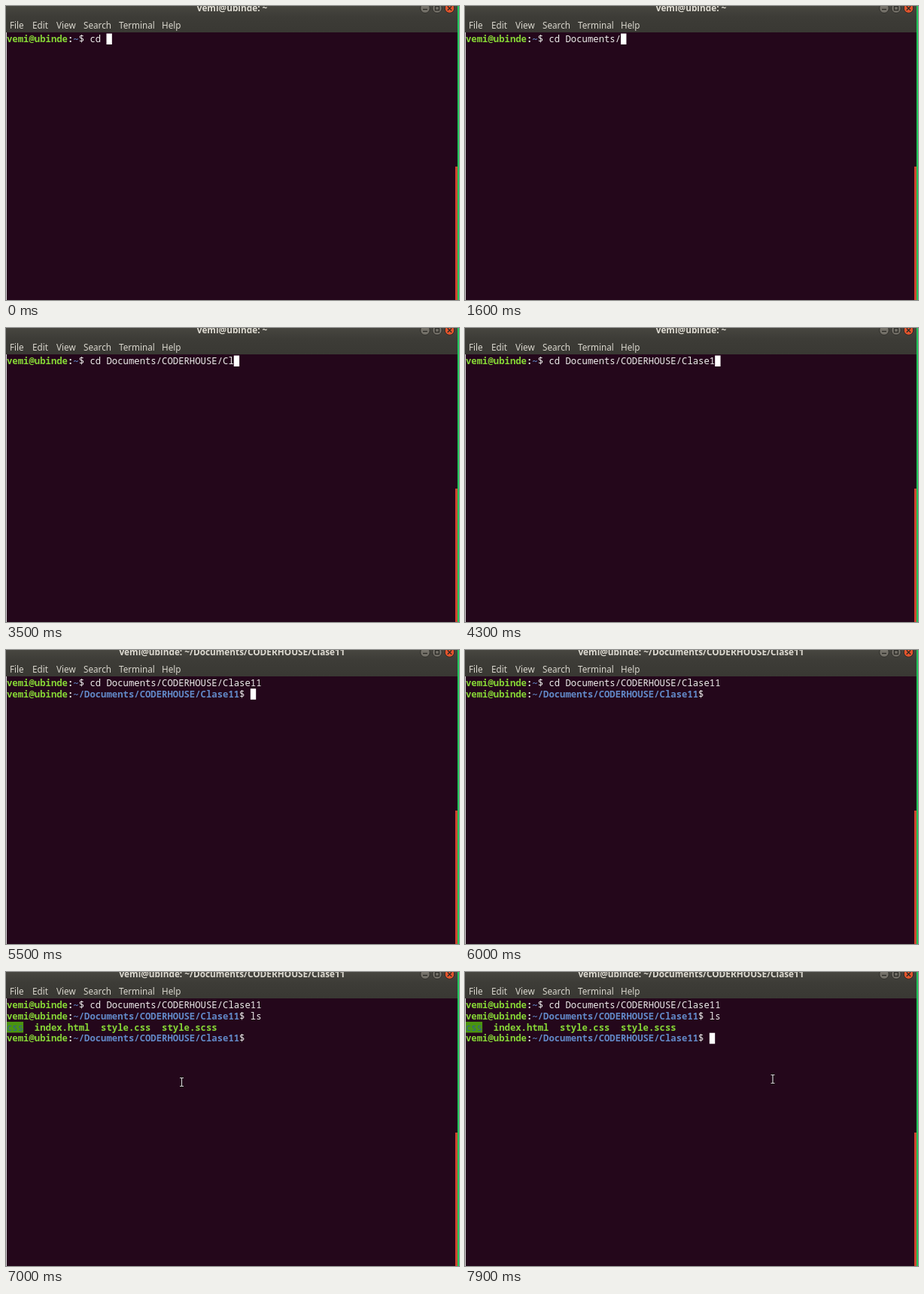
An HTML page with a canvas that plays this animation: 602x390 px, repeating every 8 s.

```html
<!DOCTYPE html>
<html lang="en">
<head>
<meta charset="utf-8">
<title>Terminal</title>
<style>
html, body { margin: 0; width: 100%; height: 100%; overflow: hidden; background: #24071b; }
canvas { display: block; width: 602px; height: 390px; }
</style>
</head>
<body>
<canvas id="stage" width="602" height="390"></canvas>
<script>
const ctx = document.getElementById('stage').getContext('2d');
const LOOP = 8000, STEP = 100, BLINK = 600;
const CELL = 7.36, LEFT = 1, TOP = 36.5, ROW = 14.75;
const MONO = '12.27px "Noto Sans Mono", "DejaVu Sans Mono", monospace';
const SANS = '"Noto Sans", "Open Sans", sans-serif';
const GREEN = '#86d636', BLUE = '#6289c8', WHITE = '#eeeeec';

const USER = 'vemi@ubinde';
const DIR = '~/Documents/CODERHOUSE/Clase11';

// [time, command line after the key press]
const TYPING = [
  [0, 'cd '], [700, 'cd D'], [900, 'cd Do'], [1100, 'cd Doc'],
  [1300, 'cd Documents/'],
  [1900, 'cd Documents/C'], [2100, 'cd Documents/CODERHOUSE/'],
  [3300, 'cd Documents/CODERHOUSE/C'], [3500, 'cd Documents/CODERHOUSE/Cl'],
  [3700, 'cd Documents/CODERHOUSE/Clase'],
  [4200, 'cd Documents/CODERHOUSE/Clase1'],
  [4500, 'cd Documents/CODERHOUSE/Clase11'],
  [5400, ''], [6100, 'l'], [6200, 'ls'], [6400, '']
];
const CD_DONE = 5400, TITLE_AT = 5500, LS_DONE = 6400;
const POINTER_IN = 6800, MOVE_FROM = 7200, MOVE_TO = 7800;

function rect(x, y, w, h, color) {
  ctx.fillStyle = color;
  ctx.fillRect(x, y, w, h);
}

function text(str, x, y, font, color, align = 'left') {
  ctx.font = font;
  ctx.fillStyle = color;
  ctx.textAlign = align;
  ctx.fillText(str, x, y);
}

function put(str, col, row, color, bold) {
  const y = Math.round(TOP + 11.5 + row * ROW);
  text(str, LEFT + col * CELL, y, (bold ? 'bold ' : '') + MONO, color);
}

function block(col, row, cells, color) {
  rect(LEFT + col * CELL, TOP + row * ROW, cells * CELL, 14.5, color);
}

// Draws a prompt with its command and returns the column after it.
function prompt(row, dir, cmd) {
  let col = 0;
  const parts = [[USER, GREEN, true], [':', WHITE, true], [dir, BLUE, true], ['$ ' + cmd, WHITE, false]];
  for (const [str, color, bold] of parts) {
    put(str, col, row, color, bold);
    col += str.length;
  }
  return col;
}

function listing(row) {
  block(0, row, 3, '#4a9410');
  put('css', 0, row, '#2f5f96');
  put('index.html', 5, row, GREEN, true);
  put('style.css', 17, row, GREEN, true);
  put('style.scss', 28, row, GREEN, true);
}

function button(x, color, glyph) {
  ctx.beginPath();
  ctx.arc(x, 3, 6.3, 0, Math.PI * 2);
  ctx.fillStyle = color;
  ctx.fill();
  ctx.strokeStyle = '#2c2b27';
  ctx.lineWidth = 1;
  ctx.stroke();
  ctx.lineWidth = 1.4;
  ctx.beginPath();
  glyph(x);
  ctx.stroke();
}

function chrome(title) {
  const shade = ctx.createLinearGradient(0, 0, 0, 35);
  shade.addColorStop(0, '#474640');
  shade.addColorStop(0.4, '#3d3c37');
  shade.addColorStop(1, '#393833');
  rect(0, 0, 602, 35, shade);
  text(title, 300.5, 7, 'bold 11.8px ' + SANS, '#dedbd2', 'center');

  button(557, '#75726a', x => { ctx.moveTo(x - 3, 4.5); ctx.lineTo(x + 3, 4.5); });
  button(573, '#75726a', x => ctx.rect(x - 2.5, 0.5, 5, 5));
  button(589.5, '#e4552d', x => {
    ctx.moveTo(x - 2.7, 0.3); ctx.lineTo(x + 2.7, 5.7);
    ctx.moveTo(x + 2.7, 0.3); ctx.lineTo(x - 2.7, 5.7);
  });

  const menu = [['File', 5], ['Edit', 35], ['View', 67], ['Search', 103], ['Terminal', 150], ['Help', 207]];
  for (const [label, x] of menu) text(label, x, 30, '11.7px ' + SANS, '#d9d6cd');
}

function edges() {
  rect(0, 35, 1, 355, '#d8d4d8');
  rect(597, 213, 3, 177, '#cf4430');
  rect(600, 0, 2, 390, '#1fc65a');
}

function beam(x, y) {
  const path = () => {
    ctx.beginPath();
    ctx.moveTo(x - 2.5, y - 5.5); ctx.lineTo(x + 2.5, y - 5.5);
    ctx.moveTo(x, y - 5.5); ctx.lineTo(x, y + 5.5);
    ctx.moveTo(x - 2.5, y + 5.5); ctx.lineTo(x + 2.5, y + 5.5);
  };
  for (const [width, color] of [[3, '#12030d'], [1.2, '#d4d0d4']]) {
    path();
    ctx.lineWidth = width;
    ctx.strokeStyle = color;
    ctx.stroke();
  }
}

function pointer(t) {
  if (t < POINTER_IN) return;
  const p = Math.min(1, Math.max(0, (t - MOVE_FROM) / (MOVE_TO - MOVE_FROM)));
  const e = p * p * (3 - 2 * p);
  beam(233.5 + 175.5 * e, 146 - 4 * e);
}

function draw(t) {
  rect(0, 0, 602, 390, '#24071b');
  chrome(USER + ': ' + (t < TITLE_AT ? '~' : DIR));

  const [pressed, cmd] = TYPING.filter(k => k[0] <= t).pop();
  let row = 0, col;
  if (t < CD_DONE) {
    col = prompt(0, '~', cmd);
  } else {
    prompt(0, '~', 'cd Documents/CODERHOUSE/Clase11');
    row = 1;
    if (t >= LS_DONE) {
      prompt(1, DIR, 'ls');
      listing(2);
      row = 3;
    }
    col = prompt(row, DIR, cmd);
  }

  // The caret restarts its blink at each key press.
  const lit = pressed === 0 || Math.floor((t - pressed) / BLINK) % 2 === 0;
  if (lit) block(col, row, 1, '#ffffff');

  edges();
  pointer(t);
}

const start = performance.now();
function tick() {
  const t = (performance.now() - start) % LOOP;
  draw(Math.floor(t / STEP) * STEP);
  requestAnimationFrame(tick);
}
tick();
</script>
</body>
</html>
```
